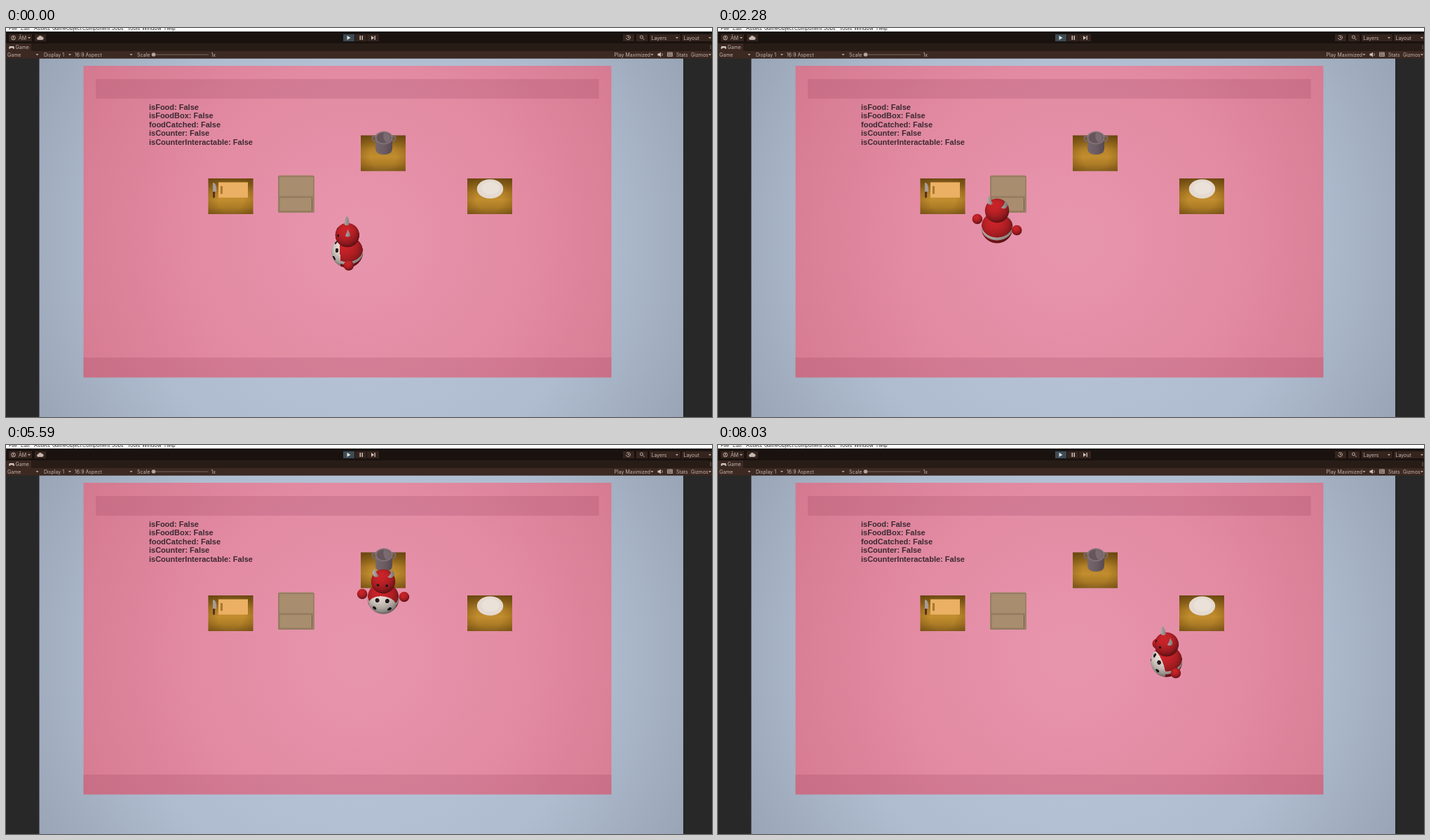
These frames come from a looping animation (1007x556 px, 8.09 s). An HTML page with a canvas:

```html
<!DOCTYPE html>
<html lang="en">
<head>
<meta charset="utf-8">
<title>Kitchen prototype</title>
<style>
html, body { margin: 0; width: 100%; height: 100%; overflow: hidden; background: #272827; }
canvas { display: block; width: 100vw; height: 100vh; }
</style>
</head>
<body>
<canvas id="stage" width="1007" height="556"></canvas>
<script>
const W = 1007, H = 556, LOOP = 8090, RAD = Math.PI / 180;
const makeCanvas = (w, h) => Object.assign(document.createElement('canvas'), { width: w, height: h });
const stage = document.getElementById('stage').getContext('2d');
const backdrop = makeCanvas(W, H);
let g = backdrop.getContext('2d');

function rect(x, y, w, h, fill) { g.fillStyle = fill; g.fillRect(x, y, w, h); }
function oval(x, y, rx, ry, fill) {
  g.fillStyle = fill;
  g.beginPath();
  g.ellipse(x, y, rx, ry, 0, 0, 7);
  g.fill();
}
function shape(path, fill) { g.fillStyle = fill; g.fill(new Path2D(path)); }
function line(path, color, width = 1) {
  g.strokeStyle = color;
  g.lineWidth = width;
  g.stroke(new Path2D(path));
}
function text(s, x, y, color = '#c4b6ae', font = '7px Inter, sans-serif') {
  g.font = font;
  g.fillStyle = color;
  g.fillText(s, x, y);
}
function arrow(x, y) { shape(`M${x - 2} ${y - 1}h4l-2 2.5z`, '#b5a69e'); }
function gradient(kind, coords, ...colors) {
  const fill = kind === 'radial' ? g.createRadialGradient(...coords) : g.createLinearGradient(...coords);
  colors.forEach((c, i) => fill.addColorStop(i / (colors.length - 1), c));
  return fill;
}

function drawEditor() {
  rect(0, 0, W, 5, '#fff');
  [['File', 4], ['Edit', 21], ['Assets', 40], ['GameObject', 66], ['Component', 109], ['Jobs', 151],
    ['Tools', 173], ['Window', 194], ['Help', 226]]
    .forEach(([s, x]) => text(s, x, 3, '#222', '7.2px Inter, sans-serif'));
  rect(0, 5, W, 17, '#19120f');
  rect(0, 22, W, 11, '#281c17');
  rect(0, 22, 36, 11, '#3a2822');
  rect(0, 33, W, 10.5, '#3c2922');

  // Account, cloud and play controls
  rect(4, 9, 33, 10, '#35241e');
  line('M13.5 14a3 3 0 1 1-6 0a3 3 0 1 1 6 0M8.5 16q2-2 4 0', '#c4b6ae', .8);
  oval(10.5, 13, 1.1, 1.1, '#c4b6ae');
  text('ÂM', 18, 16.5);
  arrow(33, 14);
  rect(41, 9, 16, 10, '#35241e');
  shape('M46 17a2 2 0 0 1 0-4a3 3 0 0 1 5.5-.5a2.3 2.3 0 0 1 .5 4.5z', '#c4b6ae');
  rect(481, 9, 16, 10, '#3d4b55');
  rect(498, 9, 16, 10, '#35241e');
  rect(515, 9, 17, 10, '#35241e');
  shape('M486.5 11v6l5-3z', '#e2e6dc');
  shape('M504.5 11h1.5v6h-1.5zM507.5 11h1.5v6h-1.5zM521 11v6l4-3zM525.5 11h1.3v6h-1.3z', '#d0c4bd');
  rect(880, 9, 16, 10, '#35241e');
  line('M885 12a3 3 0 1 1-.5 2M887.5 12v2h2', '#c4b6ae', .9);
  rect(899, 9, 16, 10, '#35241e');
  line('M908.5 13a2 2 0 1 1-4 0a2 2 0 1 1 4 0M908 14.5l2.5 2.5', '#c4b6ae', .9);
  rect(918, 9, 44, 10, '#35241e');
  text('Layers', 920.5, 16.5);
  arrow(957, 14);
  rect(964, 9, 43, 10, '#35241e');
  text('Layout', 966.5, 16.5);
  arrow(1004, 14);

  // Game tab and its toolbar
  shape('M5 26h6q1.5 2 .5 4q-1.500 0-2-1.500h-3q-.5 1.500-2 1.500q-1-2 .5-4z', '#d0c4bd');
  text('Game', 13.5, 30);
  [25, 27, 29].forEach(y => rect(1004.500, y, 1, 1, '#b5a69e'));
  [['Game', 2], ['Display 1', 54], ['16:9 Aspect', 98], ['Scale', 187], ['1x', 292.5],
    ['Play Maximized', 867.5], ['Stats', 956], ['Gizmos', 977]].forEach(([s, x]) => text(s, x, 40.5));
  [44.5, 91, 178.5, 921.5, 1004].forEach(x => arrow(x, 38));
  rect(208, 37.600, 81, 1, '#79665d');
  oval(210.5, 38, 2.8, 2.8, '#b3a49c');
  shape('M929.5 36.500h2l2.500-2v7l-2.500-2h-2z', '#d0c4bd');
  line('M935.5 36q1.5 2 0 4', '#d0c4bd', .8);
  line('M943.5 35h7v5.500h-7zM943.5 37h7M943.5 39h7M946 35v4M948.500 35v4', '#c4b6ae', .8);
}

function drawCounter(x, y) {
  rect(x, y, 64, 51, gradient('linear', [0, y, 0, y + 51], '#765217', '#94691e', '#b68329', '#c18d2e', '#ae7d26', '#8a621f'));
  rect(x, y, 64, 51, gradient('radial', [x + 32, y + 30, 18, x + 32, y + 28, 46], '#50300000', '#50300070'));
}

function drawScene() {
  rect(0, 43.5, W, H, '#272827');
  rect(47.5, 43.5, 918.5, H, gradient('radial', [505, 300, 120, 505, 300, 560], '#b7c4d8', '#afbccf', '#95a1b2'));
  rect(110.500, 54, 753, 445.500, gradient('radial', [505, 300, 30, 505, 300, 470], '#e795ad', '#e28aa2', '#d3788f'));
  rect(128, 73, 717.500, 28, '#8a35502e');
  rect(110.500, 471, 753, 28.500, '#8a35502e');
  ['isFood', 'isFoodBox', 'foodCatched', 'isCounter', 'isCounterInteractable'].forEach((s, i) =>
    text(s + ': False', 204, 116.500 + i * 12.500, '#3b2932', 'bold 11px "Liberation Sans", Arial, sans-serif'));

  drawCounter(288.500, 215);
  rect(303, 220.500, 42, 22, '#ebb063');
  rect(306, 226, 3, 11, '#a87631');
  shape('M295 221q4 0 5 7v6h-5z', '#a79a97');
  rect(295, 234, 3, 8.500, '#56301f');

  g.fillStyle = '#a88d6e';
  g.beginPath();
  g.roundRect(388, 210.500, 51.500, 53.500, 2);
  g.fill();
  line('M389 212v51h50v-51zM389 241h50', '#866f56', 1);
  line('M390.5 242.500v19h46v-19z', '#937a5e', .8);
  line('M436.500 243v18', '#6b5743', 1);

  drawCounter(506, 153.500);
  line('M528 155h-5q-2 6 5 7M550 155h5q2 6-5 7', '#776569', 2.5);
  shape('M527 157v16q1 8 12 8t12-8v-16z', gradient('linear', [527, 0, 551, 0], '#76676c', '#6c5c63', '#574a50'));
  oval(539, 157, 12.500, 9.500, '#82747a');
  oval(539, 157, 10.500, 7.800, '#66565c');
  shape('M539 149.500q9 1 9.500 7.500q-1 6-6 7q-6-6-3.500-14.500z', '#7b6a70');

  drawCounter(658, 215);
  oval(690.500, 230, 18.700, 13.700, '#e5dad0');
  oval(691, 229, 12.500, 9, '#eae1d8');
}

const SCALE = 2, sprite = makeCanvas(112, 112), spriteCtx = sprite.getContext('2d');
const RED = [205, 36, 42], WHITE = [240, 228, 220], DARK = [38, 28, 32];

// Shades a sphere; paint gets the surface normal as forward, right, up.
function sphere(cx, cy, r, yaw, paint) {
  const size = Math.ceil(r * SCALE + 2) * 2, mid = size / 2;
  const img = spriteCtx.createImageData(size, size);
  const c = Math.cos(yaw), s = Math.sin(yaw);
  for (let j = 0; j < size; j++) for (let i = 0; i < size; i++) {
    let x = (i + .5 - mid) / SCALE / r, y = (j + .5 - mid) / SCALE / r;
    const d = Math.hypot(x, y), alpha = Math.min(1, (1 - d) * r * SCALE + .5);
    if (alpha <= 0) continue;
    if (d > 1) { x /= d; y /= d; }
    const z = Math.sqrt(Math.max(0, 1 - x * x - y * y));
    const depth = .8 * y + .6 * z, up = .8 * z - .6 * y;
    const rgb = paint(x * c + depth * s, depth * c - x * s, up);
    const light = .55 + .45 * (.84 * z - .45 * y - .2 * x);
    const k = (j * size + i) * 4;
    rgb.forEach((v, n) => img.data[k + n] = v * light);
    img.data[k + 3] = alpha * 255;
  }
  spriteCtx.clearRect(0, 0, 112, 112);
  spriteCtx.putImageData(img, 0, 0);
  g.drawImage(sprite, 0, 0, size, size, cx - mid / SCALE, cy - mid / SCALE, size / SCALE, size / SCALE);
}

const spot = (f, r, u, f0, r0, u0, size) => Math.hypot(f - f0, Math.abs(r) - r0, u - u0) < size;
const plainPaint = () => RED;
const headPaint = (f, r, u) => spot(f, r, u, .79, .37, .49, .12) ? DARK : RED;
function bodyPaint(f, r, u) {
  if (spot(f, r, u, .69, .32, .65, .14) || spot(f, r, u, .874, .48, .066, .14)) return DARK;
  return f > .5 || Math.abs(u - .1) < .13 ? WHITE : RED;
}

function drawHorn(x, y, yaw, side) {
  const at = (right, up) => [
    x - Math.sin(yaw) * side * right * 17.5,
    y + (.8 * Math.cos(yaw) * side * right - .6 * up) * 17.5
  ];
  const [bx, by] = at(.58, .68), [mx, my] = at(.85, 1.15), [tx, ty] = at(.68, 1.7);
  shape(`M${bx - 3.5} ${by}Q${mx - 3} ${my} ${tx} ${ty}Q${mx + 4} ${my} ${bx + 3.5} ${by}Q${bx} ${by + 3} ${bx - 3.5} ${by}z`,
    gradient('linear', [bx - 4, 0, bx + 4, 0], '#b3a8a6', '#827a7b'));
}

function drawChef(x, y, yaw) {
  const hands = [-1, 1].map(side => ({ x: -Math.sin(yaw) * 30 * side, y: Math.cos(yaw) * 23.5 * side }))
    .sort((a, b) => a.y - b.y);
  const hand = h => sphere(x + h.x, y - 4 + h.y, 7.2, yaw, plainPaint);
  hand(hands[0]);
  sphere(x, y, 22.5, yaw, bodyPaint);
  sphere(x, y - 24, 17.2, yaw, headPaint);
  (Math.cos(yaw) > 0 ? [-1, 1] : [1, -1]).forEach(side => drawHorn(x, y - 24, yaw, side));
  hand(hands[1]);
}

// time, x, y, facing in degrees (0 right, 90 towards the viewer)
const route = [
  [0, 487, 320, 176], [150, 453, 319, 190], [750, 327, 287, 238], [850, 327, 287, 243],
  [1500, 327, 287, 243], [1620, 344, 287, 345], [1850, 398, 285, 345], [1980, 398, 285, 290],
  [2800, 398, 285, 290], [2880, 414, 282, 345], [3230, 496, 263, 327], [3460, 538, 219, 300],
  [3560, 538, 219, 270], [5300, 538, 219, 270], [5480, 538, 219, 455], [5720, 538, 219, 455],
  [5850, 561, 232, 394], [6450, 685, 298, 370], [6580, 685, 298, 317], [7770, 685, 298, 317],
  [7860, 671, 301, 170], [8030, 640, 309, 154], [LOOP, 628, 312, 158]
];
function poseAt(t) {
  const i = route.findIndex(key => key[0] > t), a = route[i - 1], b = route[i];
  const k = (t - a[0]) / (b[0] - a[0]);
  return a.map((v, n) => v + (b[n] - v) * k);
}

drawScene();
drawEditor();
g = stage;

function frame() {
  const [, x, y, yaw] = poseAt(performance.now() % LOOP);
  g.drawImage(backdrop, 0, 0);
  drawChef(x, y, yaw * RAD);
  requestAnimationFrame(frame);
}
frame();
</script>
</body>
</html>
```
